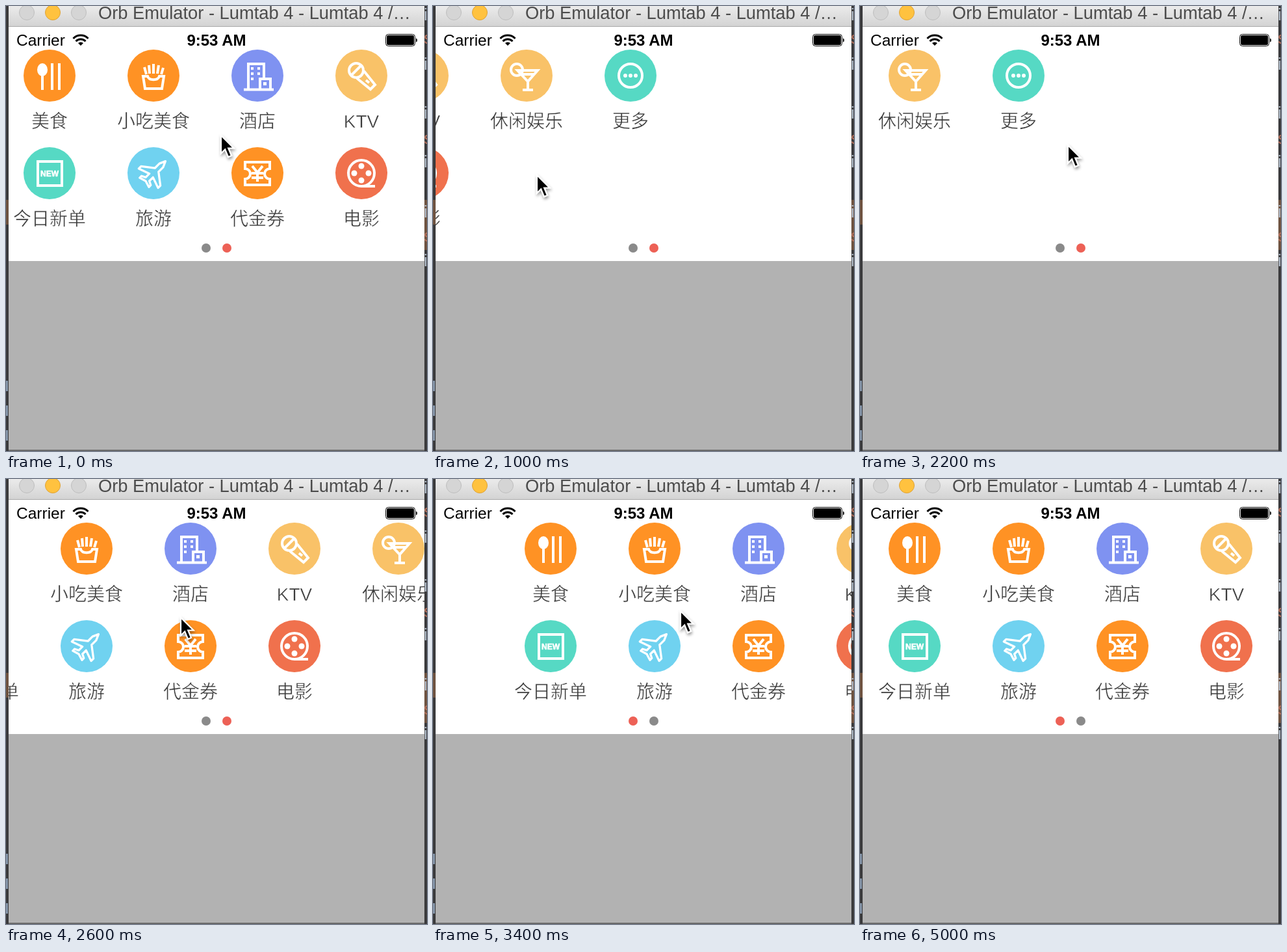
These frames come from a looping animation (648 by 684 pixels, 5.2 s). An HTML page:

```html
<!DOCTYPE html>
<html lang="zh-CN">
<head>
<meta charset="utf-8">
<title>Menu pager</title>
<style>
  html, body { margin: 0; width: 100%; height: 100%; overflow: hidden; }
  svg { display: block; }
  #stage { width: 100%; height: 100%; }
  text { font-family: "Liberation Sans", "Noto Sans CJK SC", "Noto Sans CJK", sans-serif; }
  /* The thin white outline lightens the strokes of the glyphs */
  .label { font-size: 28px; font-weight: 300; fill: #3b3b3b; stroke: #fff; stroke-width: .5px; text-anchor: middle; }
  .icon { fill: none; stroke: #fff; stroke-width: 4; }
  .icon .solid { fill: #fff; stroke: none; }
  .code text { font-size: 26px; fill: #b4bfcc; }
</style>
</head>
<body>
<svg id="stage" viewBox="0 0 648 684">
  <defs>
    <linearGradient id="bar" x2="0" y2="1">
      <stop stop-color="#ebebeb"/><stop offset="1" stop-color="#d3d3d3"/>
    </linearGradient>
    <filter id="shadow" x="-50%" y="-50%" width="200%" height="200%">
      <feDropShadow dx="1" dy="3" stdDeviation="2" flood-opacity=".4"/>
    </filter>
  </defs>

  <!-- Editor showing behind the window -->
  <rect width="648" height="684" fill="#3a3a3c"/>
  <path d="M0 298h4v38h-4zM644 298h4v77h-4z" fill="#6e5340"/>
  <path d="M0 576h3v16h-3zM0 614h3v16h-3zM0 652h3v16h-3z" fill="#8595a8"/>
  <g class="code" id="code"></g>

  <rect x="4" width="640" height="31" fill="url(#bar)"/>
  <rect x="4" y="31" width="640" height="1" fill="#aaa"/>
  <g fill="#d5d5d5" stroke="#bebebe">
    <circle cx="32" cy="10" r="11.5"/>
    <circle cx="72" cy="10" r="11.5" fill="#ffc23f" stroke="#dfa236"/>
    <circle cx="112" cy="10" r="11.5"/>
  </g>
  <text x="142" y="20" font-size="27.3" fill="#4c4c4c">Orb Emulator - Lumtab 4 - Lumtab 4 /…</text>

  <rect x="4" y="32" width="640" height="360" fill="#fff"/>
  <rect x="4" y="392" width="640" height="290" fill="#b2b2b2"/>
  <rect x="4" y="682" width="640" height="2" fill="#6a6a6a"/>

  <text x="16" y="61" font-size="24.5">Carrier</text>
  <g fill="none" stroke="#000" stroke-width="3">
    <path d="M103.500 50a16 16 0 0 1 23 0M107.500 54.200a10.500 10.500 0 0 1 15 0"/>
    <path d="M115 61l-4-4a6 6 0 0 1 8 0z" fill="#000" stroke="none"/>
  </g>
  <text x="324" y="61" font-size="24" font-weight="bold" text-anchor="middle">9:53 AM</text>
  <rect x="584.500" y="43.500" width="45" height="18" rx="4" fill="none" stroke="#000"/>
  <rect x="586" y="45" width="42" height="15" rx="2.500"/>
  <path d="M631 49.500q2 .5 2 3t-2 3z"/>

  <svg x="4" width="640" height="684"><g id="menu"></g></svg>
  <circle id="dot0" cx="308" cy="372" r="7"/>
  <circle id="dot1" cx="340" cy="372" r="7"/>

  <path id="cursor" d="M0 0V27.500L6.200 21.500 11 33 16 31 11.200 19.500H19.500Z"
    stroke="#fff" stroke-width="2.200" filter="url(#shadow)"/>
</svg>

<script>
const byId = id => document.getElementById(id);
const line = d => `<path d="${d}"/>`;
const ring = (x, y, r) => `<circle cx="${x}" cy="${y}" r="${r}"/>`;
const disc = (x, y, r) => `<circle class="solid" cx="${x}" cy="${y}" r="${r}"/>`;
const solid = d => `<path class="solid" d="${d}"/>`;

const icons = {
  cutlery: '<ellipse class="solid" cx="-11" cy="-9" rx="8" ry="10"/>' +
    line('M-11 0V22M4 -19V22M15 -19V22'),
  fries: line('M-16 1H-9C-7 8 7 8 9 1H16L13 20H-13Z') +
    line('M-14 -13L-11 -2M-7 -16L-6 -3M0 -18V-3M8 -16L6 -3M15 -12L12 -2'),
  hotel: line('M-14 22V-18H10V5M-21 21.500H25M4 21V5H20V21') +
    solid('M-10 -13h4v4h-4zM0 -13h4v4h-4zM-10 -5h4v4h-4zM0 -5h4v4h-4zM-10 3h4v4h-4zM9 10h5v5h-5z'),
  mic: ring(-8, -8, 11) + line('M-16 0L0 -16M-7 4L14 21 21 14 4 -7M7 7L12 11'),
  fresh: '<rect x="-18" y="-18" width="37" height="37"/>' +
    '<text y="4.500" font-size="12" font-weight="bold" text-anchor="middle" fill="#fff" stroke-width=".6">NEW</text>',
  plane: `<g transform="rotate(-45)" stroke-width="3.300" stroke-linejoin="round">` +
    line('M26 0L17 -4H7L-6 -21H-11L-5 -4H-13L-16 -10H-20L-17 0 -20 10H-16L-13 4H-5L-11 21H-6L7 4H17Z') + '</g>',
  coupon: line('M-19 -17H19V-7A8 8 0 0 0 19 9V18H-19V9A8 8 0 0 0 -19 -7Z') +
    line('M-8 -11L0 -1 8 -11M0 -1V13M-9 0H9M-9 7H9'),
  film: ring(0, 0, 20) + line('M0 20H21') +
    disc(0, -11, 4.5) + disc(0, 11, 4.5) + disc(-11, 0, 4.5) + disc(11, 0, 4.5),
  cocktail: ring(-15, -9, 9) + line('M-14 -8H17L2 9ZM-8 -2H11M2 9V22M-6 22H10'),
  more: ring(0, 0, 18) + disc(-8, 0, 3) + disc(0, 0, 3) + disc(8, 0, 3),
};

const orange = '#ff9224', teal = '#56d9c4', amber = '#f9c268';
const rows = [
  [['美食', orange, 'cutlery'], ['小吃美食', orange, 'fries'], ['酒店', '#7f92f1', 'hotel'],
   ['KTV', amber, 'mic'], ['休闲娱乐', amber, 'cocktail'], ['更多', teal, 'more']],
  [['今日新单', teal, 'fresh'], ['旅游', '#70d2f0', 'plane'], ['代金券', orange, 'coupon'],
   ['电影', '#f0714d', 'film']],
];
byId('menu').innerHTML = rows.map((row, r) => row.map(([label, color, icon], c) =>
  `<g transform="translate(${80 + 160 * c} ${107 + 150 * r})">
     <circle r="40" fill="${color}"/>
     <g class="icon">${icons[icon]}</g>
     <text class="label" y="80">${label}</text>
   </g>`).join('')).join('');

byId('code').innerHTML =
  [22, 98, 173, 248, 325, 400].map(y => `<text x="643" y="${y}">i</text>`).join('') +
  [58, 212, 362].map(y => `<text x="643" y="${y}" style="fill:#b5705c">s</text>`).join('');

// Step, scroll offset, pointer x, pointer y
const STEP = 200, STEPS = 26;
const keys = [
  [0, 17, 331, 199], [3, 261, 45, 257], [4, 440, 70, 260], [5, 580, 160, 260],
  [6, 640, 245, 255], [7, 661, 219, 252], [8, 668, 205, 250], [9, 646, 235, 238],
  [10, 640, 290, 222], [11, 640, 320, 214], [12, 304, 430, 213], [13, 120, 269, 213],
  [14, 35, 215, 213], [15, 5, 205, 211], [16, -30, 275, 207], [17, -97, 381, 203],
  [18, -115, 420, 201], [19, -50, 415, 200], [20, -12, 400, 199], [21, 0, 385, 199],
  [25, 0, 345, 199],
];

function poseAt(step) {
  const next = Math.max(1, keys.findIndex(k => k[0] >= step));
  const a = keys[next - 1], b = keys[next];
  const u = (step - a[0]) / (b[0] - a[0]);
  return a.map((v, i) => v + (b[i] - v) * u);
}

function draw(now) {
  const step = Math.floor(now / STEP) % STEPS;
  const [, scroll, x, y] = poseAt(step);
  const page = scroll > 0 ? 1 : 0;
  byId('menu').setAttribute('transform', `translate(${Math.round(-scroll)} 0)`);
  byId('cursor').setAttribute('transform', `translate(${Math.round(x)} ${Math.round(y)})`);
  byId('cursor').style.display = step === STEPS - 1 ? 'none' : '';
  for (const i of [0, 1]) byId('dot' + i).setAttribute('fill', i === page ? '#ed6156' : '#8a8a8a');
}

const start = performance.now();
function tick() {
  draw(performance.now() - start);
  requestAnimationFrame(tick);
}
tick();
</script>
</body>
</html>
```
